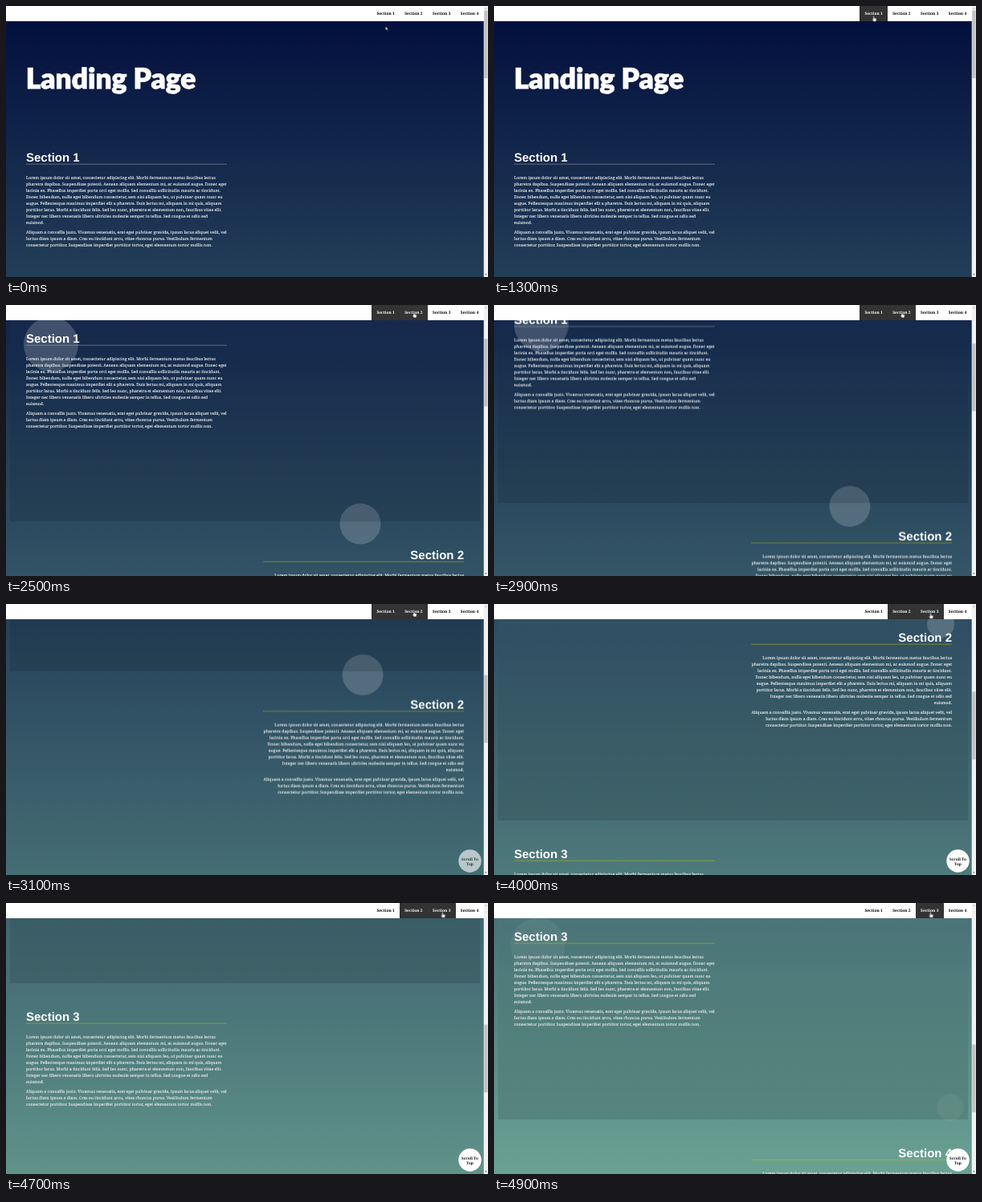
Write an HTML page that moves like this. It is 600x338 px and loops after 5 s.

```html
<!DOCTYPE html>
<html lang="en">
<head>
<meta charset="utf-8">
<title>Landing Page</title>
<style>
  html, body { margin: 0; width: 100%; height: 100%; overflow: hidden; background: #fff; }
  svg { display: block; width: 600px; height: 338px; }
  text { text-rendering: geometricPrecision; font-family: 'Noto Serif', serif; }
  .title { font: 900 35.3px Lato, sans-serif; fill: #fff; stroke: #fff; stroke-width: .9; }
  .head { font: bold 15px 'Liberation Sans', Arial, sans-serif; fill: #fff; }
  .copy { font-size: 5.15px; fill: #eee; stroke: #eee; stroke-width: .14; }
  .link { font-size: 4.95px; font-weight: bold; fill: #000; text-anchor: middle; }
  .top { font-size: 4.7px; font-weight: bold; fill: #111; text-anchor: middle; }
  .orb { fill: #fff; fill-opacity: .19; }
  .hair { fill-opacity: .45; }
  .cursor { fill: #fff; stroke: #111; stroke-width: .4; stroke-linejoin: round; }
</style>
</head>
<body>
<svg id="stage" viewBox="0 0 600 338">
  <defs>
    <linearGradient id="sky" x2="0" y2="1">
      <stop offset="0" stop-color="rgb(0,13,60)"/>
      <stop offset="1" stop-color="rgb(136,203,171)"/>
    </linearGradient>
    <linearGradient id="shade" x2="0" y2="1">
      <stop offset="0" stop-color="#fff" stop-opacity=".04"/>
      <stop offset=".3" stop-color="#000" stop-opacity=".01"/>
      <stop offset="1" stop-color="#000" stop-opacity=".12"/>
    </linearGradient>
  </defs>
  <g id="page">
    <rect width="595" height="1312" fill="url(#sky)"/>
    <text class="title" x="24.8" y="103.4">Landing Page</text>
  </g>
  <g id="toTop">
    <circle cx="577.5" cy="320.5" r="14.2" fill="#fff"/>
    <text class="top" x="577.5" y="320">Scroll To</text>
    <text class="top" x="577.5" y="326">Top</text>
  </g>
  <g id="nav"><rect width="595" height="19" fill="#fff"/></g>
  <g id="bar">
    <rect x="594.7" width="5.3" height="338" fill="#f1f1f1"/>
    <path d="M596.2 3.7L597.4 2.2L598.6 3.7Z" fill="#a3a3a3"/>
    <path d="M596.2 334.3L597.4 335.8L598.6 334.3Z" fill="#505050"/>
    <rect id="thumb" x="595.3" y="5.5" width="4.2" height="84.5" fill="#c1c1c1"/>
  </g>
  <g id="pointer">
    <path id="arrow" class="cursor" d="M0 0V4.6L1.1 3.6L1.9 5.3L2.7 5L1.9 3.4H3.3Z"/>
    <path id="hand" class="cursor"
      d="M-.8 .3q.7-.8 1.4 0v2.4l2.2 .6q.6.2.5 1l-.6 2.7H-.4L-2.2 4.3q.2-.9 1-.3l.4.4Z"/>
  </g>
</svg>
<script>
const LOOP = 5000;
const PITCH = 270, FIRST = 147;
const $ = id => document.getElementById(id);

const COPY = [
  [68.5, [
    'Lorem ipsum dolor sit amet, consectetur adipiscing elit. Morbi fermentum metus faucibus lectus',
    'pharetra dapibus. Suspendisse potenti. Aenean aliquam elementum mi, ac euismod augue. Donec eget',
    'lacinia ex. Phasellus imperdiet porta orci eget mollis. Sed convallis sollicitudin mauris ac tincidunt.',
    'Donec bibendum, nulla eget bibendum consectetur, sem nisi aliquam leo, ut pulvinar quam nunc eu',
    'augue. Pellentesque maximus imperdiet elit a pharetra. Duis lectus mi, aliquam in mi quis, aliquam',
    'porttitor lacus. Morbi a tincidunt felis. Sed leo nunc, pharetra et elementum non, faucibus vitae elit.',
    'Integer nec libero venenatis libero ultricies molestie semper in tellus. Sed congue et odio sed',
    'euismod.']],
  [137.4, [
    'Aliquam a convallis justo. Vivamus venenatis, erat eget pulvinar gravida, ipsum lacus aliquet velit, vel',
    'luctus diam ipsum a diam. Cras eu tincidunt arcu, vitae rhoncus purus. Vestibulum fermentum',
    'consectetur porttitor. Suspendisse imperdiet porttitor tortor, eget elementum tortor mollis non.']]
];

// on/off: active period; orbs: [x, y, r, period, direction]
const SECTIONS = [
  { on: 2000, off: 3180, rule: '#b8bcb0',
    orbs: [[59.5, 52.5, 34, 4000, 1], [445, 270, 25.5, 5000, -1]] },
  { on: 3180, off: 4800, rule: '#cc1', orbs: [[557.5, 30, 17, 4000, 1]] },
  { on: 4800, off: LOOP, rule: '#cc1',
    orbs: [[59.5, 53, 34, 4000, 1], [573, 254, 16.7, 5000, -1]] },
  { rule: '#cc1', orbs: [] }
];
const LINKS = [[900, 3180], [2240, 4800], [3740, LOOP], null];

// [time, scroll offset, easing towards the next step]
const SCROLL = [
  [0, 0], [1720, 0, 'ease-in-out'],
  [2080, FIRST], [2800, FIRST, 'ease-in-out'],
  [3290, FIRST + PITCH], [4419, FIRST + PITCH, 'ease-in-out'],
  [4908, FIRST + 2 * PITCH]
];
const POINTER = [
  [0, 472.5, 25.5], [700, 472.5, 25.5, 'ease-in-out'],
  [1050, 472.8, 12.3], [2080, 472.8, 12.3, 'ease-in-out'],
  [2400, 508, 8.8], [3580, 508, 8.8, 'ease-in-out'],
  [3900, 543.5, 11.3]
];

function make(parent, tag, attrs, text) {
  const el = document.createElementNS('http://www.w3.org/2000/svg', tag);
  for (const key in attrs) el.setAttribute(key, attrs[key]);
  if (text) el.textContent = text;
  return parent.appendChild(el);
}

// steps: [time, value, easing]; the last value holds until the loop ends
function play(el, prop, steps, easing = 'linear') {
  const frames = steps.map(([time, value, ease]) =>
    ({ offset: time / LOOP, [prop]: value, easing: ease || easing }));
  if (frames[frames.length - 1].offset < 1)
    frames.push({ offset: 1, [prop]: steps[steps.length - 1][1] });
  el.animate(frames, { duration: LOOP, iterations: Infinity });
}
const jump = (el, prop, steps) => play(el, prop, steps, 'steps(1, end)');

function fade(el, on, off, time) {
  const steps = [[0, 0], [on, 0, 'ease'], [on + time, 1]];
  if (off < LOOP) steps.push([off, 1, 'ease'], [Math.min(off + time, LOOP), 0]);
  if (on + time > LOOP) {
    const part = (LOOP - on) / time;
    steps[1][2] = 'linear';
    steps[2] = [LOOP, 1 - (1 - part) ** 2];
  }
  play(el, 'opacity', steps);
}

function orbit(parent, [x, y, r, period, dir], on, off) {
  const place = make(parent, 'g', { transform: `translate(${x} ${y})` });
  const orb = make(place, 'circle', { class: 'orb', r });
  const turn = a => `rotate(${a}deg) translate(-5px, 0px) rotate(${-a}deg)`;
  play(orb, 'transform', [[0, turn(0)], [on, turn(0)], [LOOP, turn(dir * 360 * (LOOP - on) / period)]]);
  fade(orb, on, off, 500);
}

SECTIONS.forEach(({ on, off, rule, orbs }, i) => {
  const g = make($('page'), 'g', { transform: `translate(0 ${FIRST + i * PITCH})` });
  const even = i % 2;
  const side = even ? { x: 570, 'text-anchor': 'end' } : { x: 25 };
  orbs.forEach(orb => orbit(g, orb, on, off));
  if (on) {
    const box = make(g, 'rect', { x: 5, width: 585, height: PITCH, fill: 'url(#shade)' });
    jump(box, 'opacity', [[0, 0], [on, 1], [off, off < LOOP ? 0 : 1]]);
  }
  make(g, 'text', { class: 'head', y: 46.5, ...side }, `Section ${i + 1}`);
  make(g, 'rect', { class: 'hair', x: even ? 320 : 25, y: 49.7, width: 250, height: 1, fill: rule });
  for (const [y, lines] of COPY)
    lines.forEach((line, n) => make(g, 'text', { class: 'copy', y: y + 8 * n, ...side }, line));
});

LINKS.forEach((span, i) => {
  const back = make($('nav'), 'rect', { x: 455 + 35 * i, width: 35, height: 19, fill: '#333', opacity: 0 });
  const label = make($('nav'), 'text', { class: 'link', x: 472.6 + 34.8 * i, y: 11.4 }, `Section ${i + 1}`);
  if (!span) return;
  const [on, off] = span;
  const steps = (idle, lit) => {
    const list = [[0, idle], [on, idle, 'ease'], [on + 300, lit, 'steps(1, end)']];
    if (off < LOOP) list.push([off, idle]);
    return list;
  };
  play(back, 'opacity', steps(0, 1));
  play(label, 'fill', steps('#000', '#fff'));
});

const shift = (x, y) => `translate(${x}px, ${y}px)`;
play($('page'), 'transform', SCROLL.map(([t, y, ease]) => [t, shift(0, -y), ease]));
play($('thumb'), 'transform', SCROLL.map(([t, y, ease]) => [t, shift(0, y * .249), ease]));
play($('pointer'), 'transform', POINTER.map(([t, x, y, ease]) => [t, shift(x, y), ease]));
jump($('arrow'), 'opacity', [[0, 1], [900, 0]]);
jump($('hand'), 'opacity', [[0, 0], [900, 1]]);
fade($('toTop'), 2920, LOOP, 500);
</script>
</body>
</html>
```
